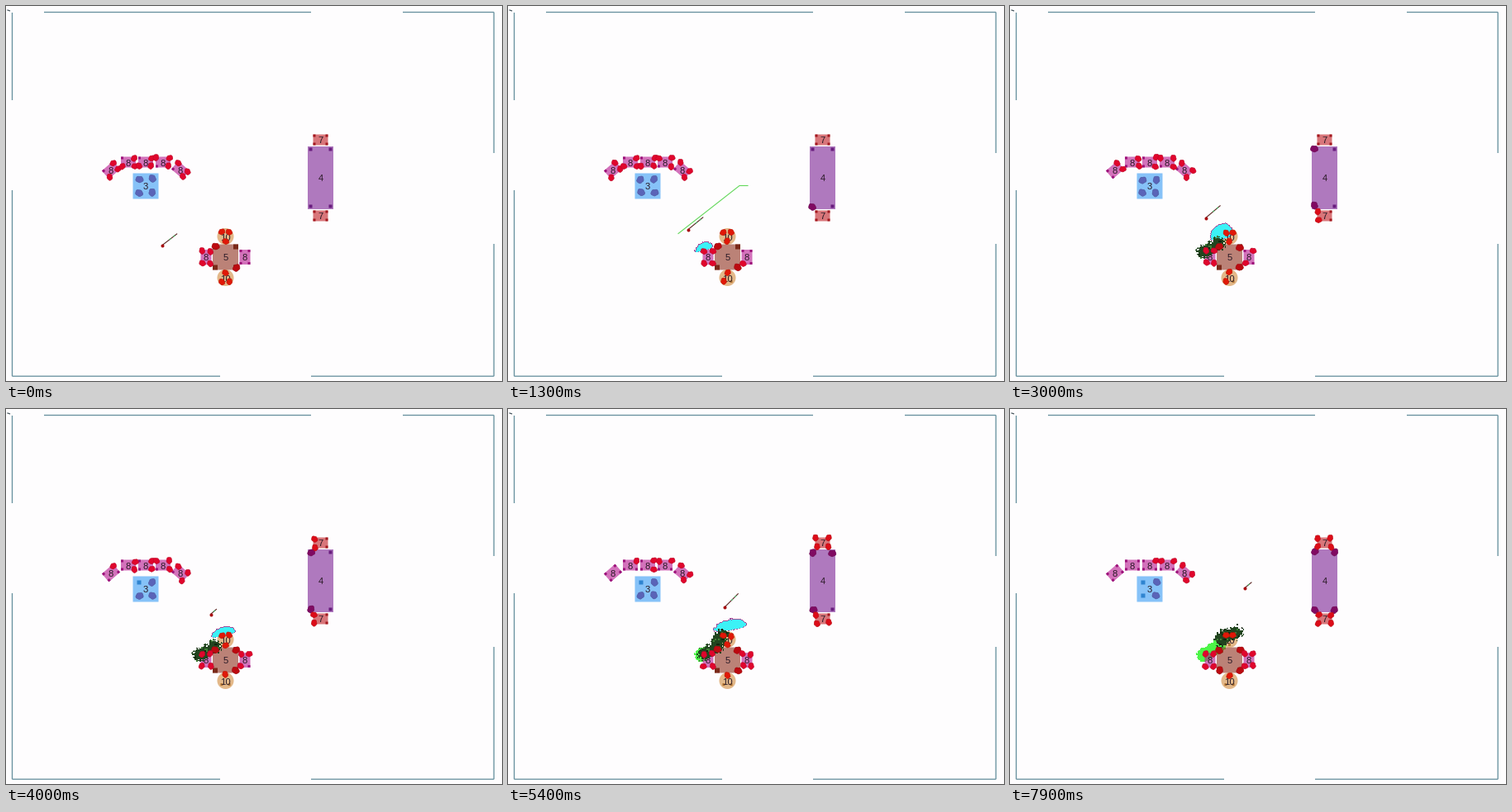
A matplotlib script that plays this animation: 600x454 px, repeating every 8000 ms.

```python
import numpy as np
import matplotlib.pyplot as plt
from matplotlib.animation import FuncAnimation
from matplotlib.collections import LineCollection, PolyCollection
from matplotlib.colors import to_rgb
from matplotlib.patches import Circle, Polygon
from matplotlib.path import Path

W, H, DPI = 600, 454, 100
FRAMES, STEP = 80, 100
PX = 72 / DPI
ALPHA = 0.6
rng = np.random.default_rng(4)

plt.rcParams["path.snap"] = False
fig = plt.figure(figsize=(W / DPI, H / DPI), dpi=DPI, facecolor="#fefdfe")
ax = fig.add_axes([0, 0, 1, 1])
ax.axis("off")

# kind: fill, colour of a detected leg, leg size, leg inset
KINDS = {
    "8": ("#d473bc", "#e0062c", 3, 1.5),
    "7": ("#d9777b", "#dc0c18", 3, 1.5),
    "10": ("#e4b98a", "#e01808", 3, 0),
    "3": ("#87c3f9", "#5a64b8", 5, 7.5),
    "4": ("#b07abf", "#800a62", 4, 3.5),
    "5": ("#bc8378", "#bc0a10", 6, 3),
}
legs = []


def rgb(colour):
    return np.array(to_rgb(colour))


def pure(colour):
    """The paint that shows as the given colour at ALPHA on white."""
    return np.clip((rgb(colour) - 1 + ALPHA) / ALPHA, 0, 1)


def corners(cx, cy, w, h, angle=0, inset=0):
    """Corners clockwise from the top left."""
    a = np.radians(angle)
    x, y = w / 2 - inset, h / 2 - inset
    pts = np.array([(-x, -y), (x, -y), (x, y), (-x, y)])
    turn = np.array([[np.cos(a), np.sin(a)], [-np.sin(a), np.cos(a)]])
    return pts @ turn + (cx, cy)


def add_piece(kind, shape, cx, cy, points, first, last, order, angle):
    """The number of detected legs runs from first to last, in this order."""
    fill, _, size, _ = KINDS[kind]
    shape.set(facecolor=(*pure(fill), ALPHA), linewidth=0, zorder=3)
    ax.add_patch(shape)
    for i, (x, y) in enumerate(points):
        ax.add_patch(Polygon(corners(x, y, size, size, angle), lw=0, zorder=4,
                             fc=pure(fill) * 0.85))
        legs.append((kind, x, y, order.index(str(i)), first, last))
    ax.text(cx, cy + 0.5, kind, family="Liberation Sans", size=11.3 * PX,
            color="#2a1a26", ha="center", va="center_baseline", zorder=6)


def add_box(kind, cx, cy, w, h, first, last, order, angle=0):
    points = corners(cx, cy, w, h, angle, KINDS[kind][3])
    add_piece(kind, Polygon(corners(cx, cy, w, h, angle)), cx, cy, points,
              first, last, order, angle)


def add_stool(cx, cy, side, first, last):
    points = [(cx + 6.5 * np.sin(a), cy + side * 6.5 * np.cos(a))
              for a in np.radians([0, 225, 135])]
    order = "120" if side > 0 else "012"
    add_piece("10", Circle((cx, cy), 10), cx, cy, points, first, last, order, 0)


# Walls, each side with a gap
L, R, T, B = 7.5, 590.2, 7.5, 448.2
walls = [[(46, T), (369, T)], [(480, T), (R, T)],
         [(L, 8), (L, 114)], [(L, 223), (L, B)],
         [(R, T), (R, 178)], [(R, 288), (R, B)],
         [(L, B), (259, B)], [(369, B), (R, B)]]
ax.add_collection(LineCollection(walls, colors="#66909e", lw=1.3 * PX, zorder=1))
ax.plot([2, 4.5], [5, 5.8], color="#405058", lw=1.2 * PX, zorder=1)

# Arc of chairs, of which the outer two are turned
for k in range(-2, 3):
    outer = abs(k) // 2
    add_box("8", 169 + 21 * k, 189 + 9.5 * outer, 18, 13, 3.7, 1.5 + k,
            "1230" if k < 1 else "1023", 20.5 * k * outer)
add_box("3", 169, 218, 31, 31, 6, 2, "1230")
add_box("4", 380.5, 208, 31, 76, 0.4, 5, "3012")
add_box("7", 380.5, 162, 18, 13, -4, 8, "0312")
add_box("7", 380.5, 254, 18, 13, 0, 5.4, "0321")
add_box("5", 265.5, 304, 31, 31, 2.5, 4.5, "0213")
add_box("8", 242, 304, 13, 18, 4, 4, "0123")
add_box("8", 289, 304, 13, 18, 0.6, 5.6, "3102")
add_stool(265.5, 279, 1, 6, 2)
add_stool(265.5, 329, -1, 3, 1)

# Detected legs
drift = rng.normal(0, 0.5, (len(legs), FRAMES // 4, 2))
phase = rng.uniform(0, 2 * np.pi, (len(legs), FRAMES // 4))
ring = np.linspace(0, 2 * np.pi, 24, endpoint=False)
blobs = ax.add_collection(PolyCollection([], lw=0.4, zorder=8))


def seen(leg, i):
    rank, first, last = leg[3:]
    return rank < np.floor(first + (last - first) * i / (FRAMES - 1))


def blob_shape(n, i):
    kind, x, y = legs[n][:3]
    dx, dy = drift[n, i // 4]
    r = 4.2 if kind in "345" else 3.6
    r = r * (1 + 0.1 * np.sin(2 * ring + phase[n, i // 4])
             + 0.06 * np.sin(5 * ring))
    return np.column_stack([x + dx + r * np.cos(ring), y + dy + r * np.sin(ring)])


# Mapped areas, as ragged cells on a small grid
X0, X1, Y0, Y1 = 218, 298, 246, 312
gx, gy = np.meshgrid(np.arange(X0, X1) + 0.5, np.arange(Y0, Y1) + 0.5)
track = np.array([(234, 298), (243, 293), (253, 287), (258, 275), (273, 271)])


def noise():
    cells = rng.normal(0, 1, ((Y1 - Y0) // 2, (X1 - X0) // 2))
    return cells.repeat(2, 0).repeat(2, 1)


noise_x, noise_y, speckle = noise(), noise(), noise()


def layer(z):
    return ax.imshow(np.zeros((*gx.shape, 4)), extent=(X0, X1, Y1, Y0),
                     interpolation="nearest", aspect="auto", zorder=z)


lime_img, cyan_img, dark_img = layer(2), layer(5), layer(7)


def paint(mask, colour):
    img = np.zeros((*gx.shape, 4))
    img[mask] = (*rgb(colour), 1)
    return img


def swept(start, stop, radius, rough):
    """Cells passed by a disc between two shares of the track."""
    if stop <= start:
        return np.zeros(gx.shape, bool)
    u = np.linspace(start, stop, 16) * (len(track) - 1)
    xs, ys = (np.interp(u, range(len(track)), c) for c in track.T)
    dx = (gx + rough * noise_x)[..., None] - xs
    dy = (gy + rough * noise_y)[..., None] - ys
    return (np.hypot(dx, dy) < radius).any(axis=-1)


def cyan_area(t):
    """A bent, lobed front that moves ahead of the mapped cells."""
    times = [1300, 3000, 4000, 5400]
    cx, cy, w, h = (np.interp(t, times, v) for v in (
        [237, 256, 263, 269], [291, 273, 269, 261],
        [11, 14, 15, 20], [6, 10, 5.5, 7]))
    x = cx + w * np.cos(ring)
    y = cy + h * np.sin(ring) + 3 * np.cos(ring) ** 2 - 3 * np.cos(ring)
    cells = np.column_stack([(gx + 0.5 * noise_x).ravel(),
                             (gy + 0.5 * noise_y).ravel()])
    mask = Path(np.column_stack([x, y])).contains_points(cells)
    mask = mask.reshape(gx.shape) & (700 <= t < 6000)
    img = paint(mask, "#3cf2f6")
    inner = np.roll(mask, 1, 0) & np.roll(mask, 1, 1) & np.roll(mask, -1, 1)
    img[mask & ~inner] = (*rgb("#a04a98"), 1)
    return img


def dark_area(t):
    tip = np.interp(t, [1500, 3000, 4000, 6500], [0, 0.5, 0.5, 1])
    tail = np.interp(t, [4500, 6700, 7900], [0, 0.2, 0.65])
    mask = swept(tail, tip, 7.5, 1.5)
    img = paint(mask, "#21451f")
    img[mask & (speckle > 1.3)] = (*rgb("#3f7f35"), 1)
    img[mask & (speckle < -1.2)] = (*rgb("#14240f"), 1)
    return img


def lime_area(t):
    stop = np.interp(t, [4500, 7900], [0, 0.6])
    return paint(swept(0, stop, 8, 0.6), "#4df548")


# Robot that aims at its goal, and the route across the room
goal = np.array([292, 210])
route, = ax.plot([206, 280, 290], [275.5, 217.5, 217.5], color="#62d85a",
                 lw=1.1 * PX, zorder=9)
trail, = ax.plot([], [], color="#5a2420", lw=1.1 * PX, zorder=10)
hint, = ax.plot([], [], color="#4cc070", lw=1.2 * PX, ls=(0, (2, 3)), zorder=10)
head, = ax.plot([], [], "o", ms=4 * PX, color="#a80c10", mew=0, zorder=11)


def draw_robot(t):
    times = [0, 1300, 4000, 5400, 6700]
    pos = np.array([np.interp(t, times, [188.5, 218, 247.5, 262, 283.5]),
                    np.interp(t, times, [290, 270.5, 248.5, 240, 217])])
    aim = goal - pos
    dist = np.hypot(*aim)
    turning = np.exp(-((t - 4000) / 350) ** 2)
    tip = pos + aim / dist * min(23, dist) * (1 - 0.6 * turning)
    mid = (pos + tip) / 2
    trail.set_data(*np.array([pos, tip]).T)
    hint.set_data(*np.array([mid, tip]).T)
    head.set_data([pos[0]], [pos[1]])
    route.set_visible(1000 <= t < 1700)


def update(i):
    t = i * STEP
    shown = [n for n, leg in enumerate(legs) if seen(leg, i)]
    colours = [rgb(KINDS[legs[n][0]][1]) for n in shown]
    blobs.set_verts([blob_shape(n, i) for n in shown])
    blobs.set_facecolor(colours)
    blobs.set_edgecolor([c * 0.85 for c in colours])
    cyan_img.set_data(cyan_area(t))
    dark_img.set_data(dark_area(t))
    lime_img.set_data(lime_area(t))
    draw_robot(t)
    return []


ax.set_xlim(0, W)
ax.set_ylim(H, 0)
anim = FuncAnimation(fig, update, frames=FRAMES, interval=STEP, repeat=True,
                     repeat_delay=0, init_func=lambda: update(0))
plt.show()
```
